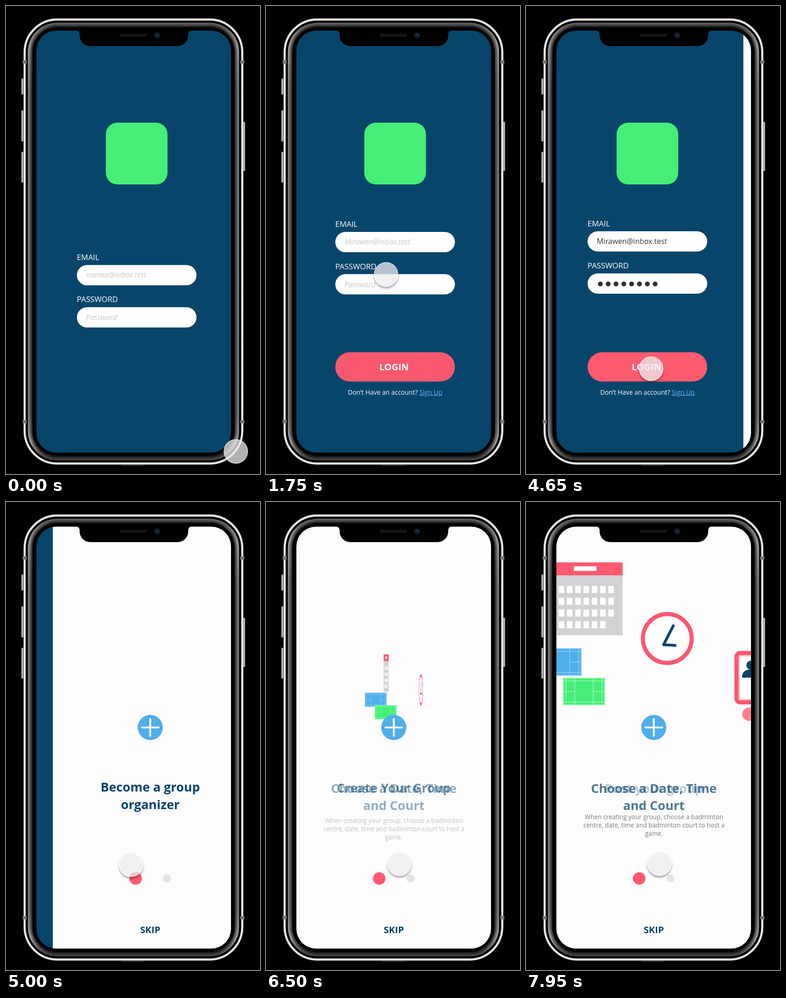
An HTML page that plays this animation: 552 px wide and 1015 px high, repeating every 8 s.

```html
<!DOCTYPE html>
<html lang="en">
<head>
<meta charset="utf-8">
<title>Login and onboarding</title>
<style>
  html, body { margin: 0; width: 100%; height: 100%; overflow: hidden; background: #000; }
  svg { display: block; width: 552px; height: 1015px; font-family: "Open Sans", sans-serif; }
  .label { font-size: 16.8px; fill: #fff; }
  .hint { font-size: 16px; font-style: italic; fill: #c9c7c9; }
  .value { font-size: 16px; fill: #333; }
  .bold { font-weight: 700; text-anchor: middle; }
  .title { font-size: 27px; fill: #07446c; }
  .para { font-size: 13.55px; fill: #6f6f72; text-anchor: middle; }
</style>
</head>
<body>
<svg viewBox="0 0 552 1015" xmlns="http://www.w3.org/2000/svg">
  <defs>
    <clipPath id="screen"><rect x="66" y="53.5" width="423" height="915" rx="43"/></clipPath>
    <linearGradient id="steel" x1="0" y1="0" x2="0" y2="1">
      <stop offset="0" stop-color="#6a6868"/>
      <stop offset=".05" stop-color="#b0adac"/>
      <stop offset=".15" stop-color="#8a8786"/>
      <stop offset=".9" stop-color="#8a8786"/>
      <stop offset=".96" stop-color="#b0adac"/>
      <stop offset="1" stop-color="#4a4848"/>
    </linearGradient>
    <filter id="lift" x="-30%" y="-30%" width="160%" height="160%">
      <feGaussianBlur in="SourceAlpha" stdDeviation="2"/>
      <feOffset dy="3.5"/>
      <feComposite in2="SourceAlpha" operator="out" result="edge"/>
      <feComponentTransfer in="edge" result="shade">
        <feFuncR type="linear" slope="0"/>
        <feFuncA type="linear" slope=".45"/>
      </feComponentTransfer>
      <feMerge><feMergeNode in="shade"/><feMergeNode in="SourceGraphic"/></feMerge>
    </filter>
  </defs>

  <g id="phone"></g>

  <g clip-path="url(#screen)">
    <rect x="66" y="53" width="423" height="916" fill="#07456a"/>
    <g id="login">
      <g id="form">
        <rect x="213.5" y="253" width="134" height="134" rx="25" fill="#45ee76"/>
        <g id="fields"></g>
      </g>
      <g id="button">
        <rect x="150.5" y="751" width="260" height="63.5" rx="31.7" fill="#ff5a70"/>
        <text class="bold" x="278.3" y="790.3" font-size="20" fill="#fff">LOGIN</text>
        <text x="178" y="842.7" font-size="13.95" fill="#fff">Don’t Have an account? <tspan fill="#62b2f2" text-decoration="underline">Sign Up</tspan></text>
      </g>
    </g>
    <g id="page">
      <rect x="66" y="53" width="423" height="916" fill="#fefdfe"/>
      <g id="icons"></g>
      <g id="card">
        <rect x="457.5" y="327.5" width="160" height="107" rx="8" fill="#fff" stroke="#fb5870" stroke-width="9"/>
        <rect x="463.5" y="333.5" width="148" height="95" rx="3" fill="none" stroke="#fdc3cb" stroke-width="3"/>
        <circle cx="489" cy="354" r="10" fill="#07446c"/>
        <path d="M469.5 381Q470 363 489 363Q508 363 508.5 381Z" fill="#07446c"/>
        <rect x="470" y="446" width="90" height="28.5" rx="14.2" fill="#ff8094"/>
      </g>
      <circle cx="277.7" cy="489" r="27.2" fill="#50aeeb"/>
      <path d="M259.5 489H296M277.7 470.8V507.2" stroke="#fff" stroke-width="4" stroke-linecap="round"/>
      <g id="titles"></g>
      <g id="para" class="para"></g>
      <circle cx="246" cy="816.5" r="13.6" fill="#ff5a70"/>
      <circle cx="314" cy="816.5" r="9" fill="#e5e4e5"/>
      <text class="bold" x="277.7" y="934.8" font-size="20.3" fill="#07426a">SKIP</text>
    </g>
  </g>

  <path d="M151 52Q160 54 160 62V64A23 23 0 0 0 183 87H373A23 23 0 0 0 396 64V62Q396 54 405 52Z"/>
  <rect x="248" y="60" width="58" height="7" rx="3.5" fill="#161616"/>
  <circle cx="328.5" cy="63.5" r="6.5" fill="#161a22"/>
  <circle cx="328.5" cy="63.5" r="3.6" fill="#12355c"/>
  <circle cx="328" cy="65" r="1.6" fill="#07101c"/>

  <circle id="touch" r="25.7" fill="#f0eff1" fill-opacity=".73" stroke="#fff" stroke-opacity=".75" stroke-width="1.4" filter="url(#lift)"/>
</svg>
<script>
const LOOP = 8000, STEP = 50;
const $ = id => document.getElementById(id);
const range = n => [...Array(n).keys()];
const mix = (a, b, p) => a + (b - a) * p;

// Eased progress between two times: quadratic in and out.
function ease(t, start, end) {
  const u = Math.min(1, Math.max(0, (t - start) / (end - start)));
  return u < .5 ? 2 * u * u : 1 - 2 * (1 - u) * (1 - u);
}

const box = (x, y, w, h, fill, r = 0) =>
  `<rect x="${x}" y="${y}" width="${w}" height="${h}" rx="${r}" fill="${fill}"/>`;

// Outline of the case, moved inwards from its outer rim.
function ring(inset, stroke, width, opacity = 1) {
  return `<rect x="${40.5 + inset}" y="${29.3 + inset}" width="${473 - 2 * inset}" height="${963 - 2 * inset}"
    rx="${71 - inset}" fill="none" stroke="${stroke}" stroke-width="${width}" stroke-opacity="${opacity}"/>`;
}

function phone() {
  const bands = [[36, 118], [509, 118], [36, 898], [509, 898]]
    .map(([x, y]) => box(x, y, 9, 7, "#777476")).join("");
  const keys = [[33.5, 157, 35], [33.5, 226, 68], [33.5, 316, 67], [515.5, 251, 107]]
    .map(([x, y, h]) => box(x, y, 4, h, "#bdb9ba", 2)).join("");
  const steel = range(6).map(i => ring(8 + 1.6 * i, "url(#steel)", 1.8, 1 - .15 * i)).join("");
  return keys + ring(0, "#8f8c8d", 5.2) + ring(0, "#efecee", 3.4) + steel +
    bands + box(250, 995.5, 52, 2, "#333", 1);
}

function fields() {
  const field = (y, name) =>
    `<text class="label" x="150.5" y="${y - 10.8}">${name}</text>` + box(150.5, y, 260, 44, "#fff", 22);
  const text = (id, cls, y, s) => `<text id="${id}" class="${cls}" x="170.5" y="${y}">${s}</text>`;
  const dots = range(8).map(i => `<circle cx="${178.2 + 17 * i}" cy="602.7" r="5.3"/>`).join("");
  return field(488.5, "EMAIL") + field(580, "PASSWORD") +
    text("hintA", "hint", 515.5, "namea@inbox.test") +
    text("hintB", "hint", 515.5, "Mirawen@inbox.test") +
    text("email", "value", 515.5, "Mirawen@inbox.test") +
    text("hintP", "hint", 608, "Password") +
    `<g id="secret" fill="#333">${dots}</g>`;
}

function calendar() {
  const cells = range(27).map(i =>
    box(-57.5 + 18 * (i % 7), -28 + 25.5 * Math.floor(i / 7), 12, 15.5, "#fff")).join("");
  return box(-81.5, -79, 163, 158, "#d2d1d3") + box(-81.5, -79, 163, 28, "#ff5a70") +
    box(-24.5, -70.5, 49, 10, "#fff") + cells;
}

const court = (fill, line) =>
  `<rect x="-45" y="-29" width="90" height="58" fill="${fill}" stroke="${line}" stroke-width="2"/>
   <path d="M-45-23H45M-45 23H45M-39-29V29M39-29V29M-20-29V29M20-29V29M-45 0H-20M20 0H45"
     fill="none" stroke="${line}" stroke-width="1.5"/>`;

const clock = () =>
  `<circle r="53" fill="#fff" stroke="#fb5870" stroke-width="9"/>
   <path d="M13-27.5L-8 13.5L17 15" fill="none" stroke="#07446c" stroke-width="6"
     stroke-linecap="round" stroke-linejoin="round"/>`;

// Resting place, starting scale and whether the icon turns as it flies out.
const icons = [
  { x: 238.5, y: 210, from: .15, turn: true, art: calendar() },
  { x: 185, y: 347, from: .16, turn: false, art: court("#50aeeb", "#8fcef5") },
  { x: 236, y: 411, from: .16, turn: false, art: court("#45ee76", "#a0f6b8") },
  { x: 417, y: 296, from: .3, turn: true, art: clock() }
];

const titles = [
  { lines: ["Become a group", "organizer"], y: 628 },
  { lines: ["Create Your Group"], y: 630 },
  { lines: ["Post your group"], y: 630.5 },
  { lines: ["Choose a Date, Time", "and Court"], y: 630.5 }
];

const para = ["When creating your group, choose a badminton",
  "centre, date, time and badminton court to host a", "game."];

const stack = (lines, x, y, gap) =>
  lines.map((s, i) => `<text x="${x}" y="${y + gap * i}">${s}</text>`).join("");

$("phone").innerHTML = phone();
$("fields").innerHTML = fields();
$("icons").innerHTML = icons.map(i => `<g>${i.art}</g>`).join("");
$("titles").innerHTML = titles.map(t =>
  `<g class="bold title">${stack(t.lines, 277.8, t.y, 37.5)}</g>`).join("");
$("para").innerHTML = stack(para, 278.2, 688, 18);

const move = (node, x, y) => node.setAttribute("transform", `translate(${x} ${y})`);
const fade = (node, a) => node.setAttribute("opacity", a);

// Pointer path: time window, then the point reached.
const touchPath = [
  [540, 1750, 261, 582],
  [1750, 2150, 267, 602],
  [3450, 4200, 272, 786.5],
  [5200, 5500, 290, 784]
];

function touch(t) {
  let x = 499.5, y = 966;
  for (const [start, end, tx, ty] of touchPath) {
    const p = ease(t, start, end);
    x = mix(x, tx, p);
    y = mix(y, ty, p);
  }
  move($("touch"), x, y);
}

function login(t) {
  const rise = ease(t, 900, 1850), fill = ease(t, 2450, 2800);
  move($("form"), 3.5 * (1 - rise), 0);
  move($("fields"), 0, 73.3 * (1 - rise));
  fade($("button"), rise);
  fade($("hintA"), 1 - rise);
  fade($("hintB"), rise * (1 - fill));
  fade($("hintP"), 1 - fill);
  fade($("email"), fill);
  fade($("secret"), fill);
}

function onboarding(t) {
  const create = ease(t, 5350, 5900), choose = ease(t, 6224, 6824), post = ease(t, 7725, 8325);
  const shown = [1 - create, create * (1 - choose), post, choose * (1 - post)];
  [...$("titles").children].forEach((node, i) => fade(node, shown[i]));

  [...$("icons").children].forEach((node, i) => {
    const { x, y, from, turn } = icons[i];
    const size = mix(from, 1, choose);
    const flip = turn ? Math.cos((1 - choose) * 143 * Math.PI / 180) : 1;
    const px = mix(277.7, x, choose) - 391 * post, py = mix(489, y, choose);
    node.setAttribute("transform", `translate(${px} ${py}) scale(${size * flip} ${size})`);
  });

  move($("card"), 391 * (.281 - post), 0);
  move($("para"), 0, 14 * (1 - choose));
  fade($("para"), choose * (1 - post * .3));
}

function draw(t) {
  const slide = 423 * ease(t, 4575, 5110);
  move($("login"), -slide, 0);
  move($("page"), 423 - slide, 0);
  login(t);
  onboarding(t);
  touch(t);
}

const began = performance.now();
function tick() {
  const t = (performance.now() - began) % LOOP;
  draw(Math.floor(t / STEP) * STEP);
  requestAnimationFrame(tick);
}
tick();
</script>
</body>
</html>
```
